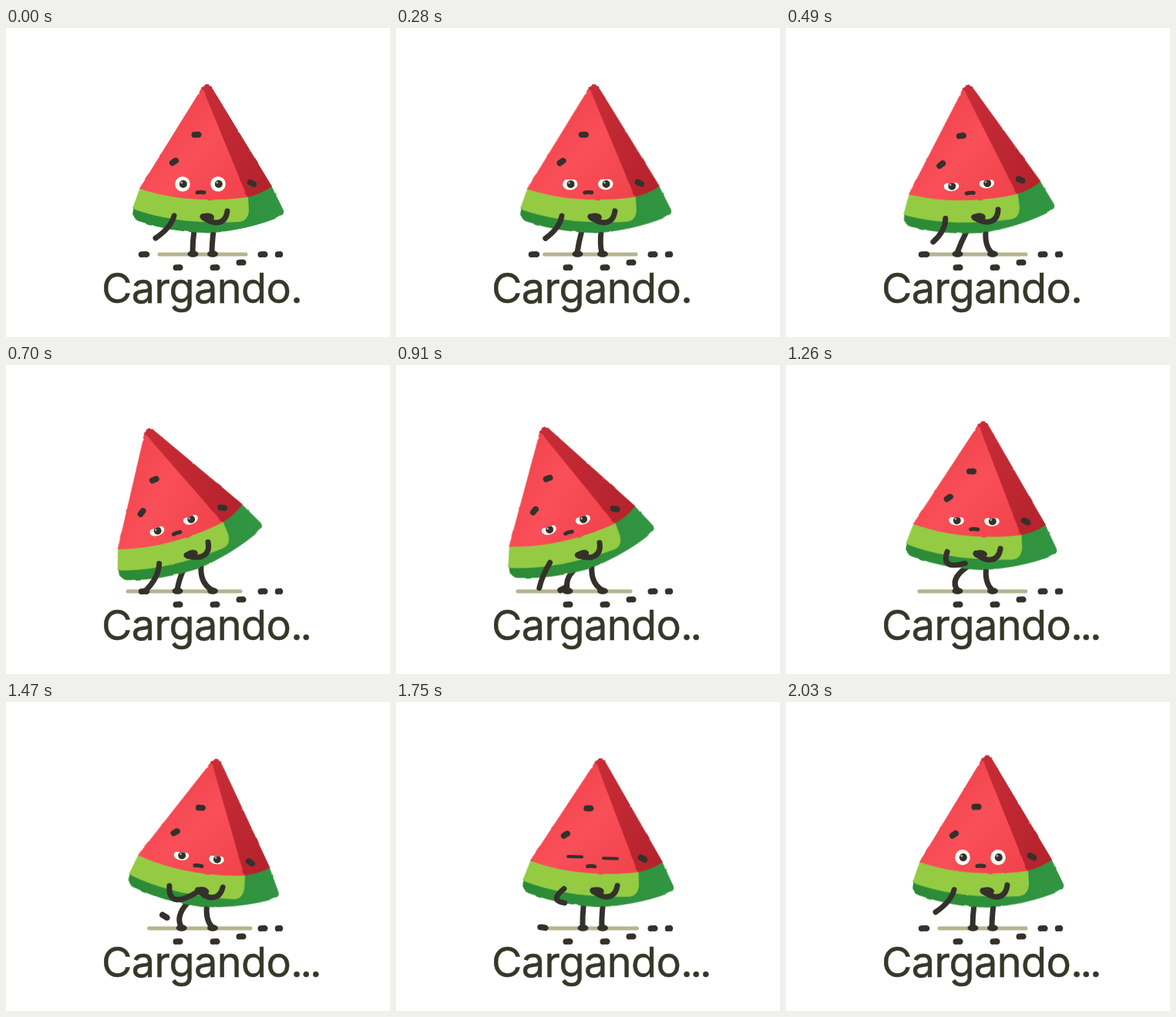
These frames come from a looping animation (498 by 400 pixels, 2100 ms). An HTML page:

```html
<!DOCTYPE html>
<html lang="es">
<head>
<meta charset="utf-8">
<title>Cargando</title>
<style>
  html, body { margin: 0; width: 100%; height: 100%; overflow: hidden; background: #fff; }
  svg { display: block; width: 498px; height: 400px; }
  .limb { fill: none; stroke: #34312b; stroke-width: 7; stroke-linecap: round; stroke-linejoin: round; }
  .dark { fill: #34312b; }
  text {
    font: 400 54px Inter, Roboto, "Liberation Sans", sans-serif;
    letter-spacing: -.6px; fill: #333828; stroke: #333828; stroke-width: .5;
  }
  .dots { letter-spacing: -3.2px; }
</style>
</head>
<body>
<svg viewBox="0 0 498 400">
  <defs>
    <linearGradient id="flesh" x1="0" y1="0" x2="1" y2="1">
      <stop offset="0" stop-color="#ec3c46"/>
      <stop offset=".55" stop-color="#f94f58"/>
      <stop offset="1" stop-color="#f0424b"/>
    </linearGradient>
    <linearGradient id="side" x1="0" y1="0" x2="1" y2="1">
      <stop offset="0" stop-color="#c92d37"/>
      <stop offset="1" stop-color="#b3222b"/>
    </linearGradient>
    <linearGradient id="rind" x1="0" x2="1">
      <stop offset="0" stop-color="#2b8a35"/>
      <stop offset="1" stop-color="#319541"/>
    </linearGradient>
    <filter id="rough" x="-5%" y="-5%" width="110%" height="110%" color-interpolation-filters="sRGB">
      <feTurbulence type="fractalNoise" baseFrequency=".1" numOctaves="1" seed="4"/>
      <feDisplacementMap in="SourceGraphic" scale="2.5" xChannelSelector="R" yChannelSelector="G"/>
    </filter>
    <clipPath id="lids"><rect id="lid" x="210" width="85" height="40"/></clipPath>
    <path id="pip" class="dark" d="M-6.5 0Q-6.5 -4 -2 -3.8L3 -4Q7 -3 6.5 1Q5.5 4.5 1 3.8L-3 4Q-6.5 4 -6.5 0Z"/>
    <g id="eye">
      <ellipse id="white" rx="9.8" fill="#fffdf5"/>
      <circle class="dark" r="5" cx=".8"/>
      <circle r="1.4" cx="-1.2" cy="-1.8" fill="#a9a6a0"/>
    </g>
  </defs>

  <path id="shade" fill="none" stroke="#b6b490" stroke-width="5" stroke-linecap="round"/>
  <use href="#pip" x="223" y="310"/>
  <use href="#pip" x="271" y="310"/>
  <use href="#pip" x="305" y="303.5"/>
  <use href="#pip" x="333" y="293"/>
  <use href="#pip" transform="translate(354 293) scale(.8 1)"/>
  <use href="#pip" id="loose"/>

  <path id="legL" class="limb"/>
  <path id="legR" class="limb"/>
  <ellipse id="footL" class="dark" rx="7" ry="4.3" cy="292.5"/>
  <ellipse class="dark" rx="7" ry="4.3" cx="268" cy="292.5"/>

  <g id="body">
    <g filter="url(#rough)">
      <path fill="url(#rind)" d="M175 207 L165 236 Q162 246 172 250 Q216 265 262 265.5 Q312 262 354 245 Q363 241 359 234 L344 204 L300 200Z"/>
      <path fill="#94cb43" d="M174 206 L164 234 Q222 255 302 251 Q314 250 315 236 L313 200Z"/>
      <path fill="url(#side)" d="M251 82 Q261 65 270 82 L345 205 Q331 215 312 219 L290 219Z"/>
      <path fill="url(#flesh)" d="M252 81 Q256 76 259 88 L313 219 Q236 229 173 208Z"/>
    </g>
    <use href="#pip" x="247" y="138"/>
    <use href="#pip" transform="translate(218 173) rotate(-32)"/>
    <use href="#pip" transform="translate(319 201) rotate(28)"/>
    <g id="open" clip-path="url(#lids)">
      <use href="#eye" x="229" y="202"/>
      <use href="#eye" x="275" y="202"/>
    </g>
    <path id="shut" class="limb" style="stroke-width:4" d="M222 201 H240 M268 202 H286"/>
    <path class="limb" style="stroke-width:5" d="M248 213 Q252 212 257 213"/>
    <path class="limb" d="M287 237 Q285 252 272 252 Q263 251 255 244"/>
    <ellipse class="dark" cx="261" cy="245" rx="9" ry="5.5"/>
  </g>
  <path id="armL" class="limb"/>
  <text x="124" y="355.5">Cargando<tspan id="dots" class="dots">.</tspan></text>
</svg>

<script>
const LOOP = 2100, STEP = 70;
const PIVOT = [262.5, 239];
const $ = id => document.getElementById(id);
const set = (id, name, value) => $(id).setAttribute(name, value);

// Timing rules: progress, eased progress, and a rise-and-fall
const ramp = (t, a, b) => Math.min(1, Math.max(0, (t - a) / (b - a)));
const ease = (t, a, b) => { const k = ramp(t, a, b); return k * k * (3 - 2 * k); };
const pulse = (t, a, b) => Math.sin(Math.PI * ramp(t, a, b));

const mix = (p, q, k) => p.map((v, i) => v + (q[i] - v) * k);
const bezier = (p, c, q, k) => mix(mix(p, c, k), mix(c, q, k), k);
const curve = (p, c, q) => `M${p}Q${c} ${q}`;

// Picked up, tucked behind the slice, then dropped and rolled home
function seedPose(t) {
  const home = [179, 293], up = ramp(t, 700, 1190), back = ramp(t, 1330, 2030);
  return t < 1330
    ? [bezier(home, [232, 301], [240, 255], up), -58 * up]
    : [bezier([215, 265], [191, 300], home, back), 50 * (1 - back) ** 2];
}

function draw(t) {
  const reach = ramp(t, 140, 700) ** 3 - ease(t, 800, 1340);
  const stride = ease(t, 140, 490) - ease(t, 1330, 1750);
  const crouch = ease(t, 490, 700) - ease(t, 1050, 1400);
  const sway = pulse(t, 1180, 1800);
  const carry = ease(t, 800, 1470) - ease(t, 1470, 2000);
  const fold = ease(t, 800, 1050) - ease(t, 1750, 2000);

  // Slice: a rigid lean about the middle of its base
  const tilt = 6.4 * sway - 18.8 * reach;
  const shift = -8 * stride - 15 * reach;
  const stretch = 1 + .035 * pulse(t, 1800, 2100);
  const [px, py] = PIVOT;
  set('body', 'transform',
    `translate(${px + shift} ${py}) rotate(${tilt}) scale(1 ${stretch}) translate(${-px} ${-py})`);
  const sin = Math.sin(tilt * Math.PI / 180), cos = Math.cos(tilt * Math.PI / 180);
  const onBody = (x, y) => [
    px + shift + (x - px) * cos - (y - py) * sin,
    py + (x - px) * sin + (y - py) * cos
  ];

  // Left arm: rest, down to the seed, up to the belly
  const shoulder = onBody(218, 243);
  const low = mix([194, 272], [181, 292], t < 800 ? reach : 1 - ease(t, 1470, 1750));
  const hand = mix(low, [248, 246], carry);
  const [mx, my] = mix(shoulder, hand, .5);
  set('armL', 'd', curve(shoulder, [mx + 8 - 28 * fold, my + 1 + 26 * carry ** 2], hand));

  // Legs
  const foot = 242 - 20 * stride;
  const hipL = onBody(244, 262), hipR = onBody(269, 262);
  const knee = (hipL[0] + foot) / 2 - 1 - 15 * pulse(t, 800, 1700);
  set('legL', 'd', curve(hipL, [knee, 277], [foot, 291]));
  set('legR', 'd', curve(hipR, [hipR[0] - 2, 282], [267, 291]));
  set('footL', 'cx', foot + .5);
  set('shade', 'd', `M${199 - 18 * stride - 23 * crouch} 293H${311 - 7 * crouch + 6 * sway}`);

  const [spot, spin] = seedPose(t);
  set('loose', 'transform', `translate(${spot}) rotate(${spin}) scale(1.12 1)`);

  // Eyes: wide, drowsy, a blink, wide again
  const blink = t >= 1680 && t < 1890;
  const lid = t < 1680 ? 1 - .5 * ramp(t, 140, 350) : 1;
  $('open').style.display = blink ? 'none' : '';
  $('shut').style.display = blink ? '' : 'none';
  set('lid', 'y', 204 - 12 * lid);
  set('white', 'ry', 3 + 6.8 * lid);

  $('dots').textContent = '.'.repeat(1 + (t >= 700) + (t >= 1260));
}

const start = performance.now();
let shown = -1;
function tick() {
  const step = Math.floor((performance.now() - start) % LOOP / STEP);
  const t = step < 2 ? 0 : step * STEP;
  if (t !== shown) draw(shown = t);
  requestAnimationFrame(tick);
}
tick();
</script>
</body>
</html>
```
